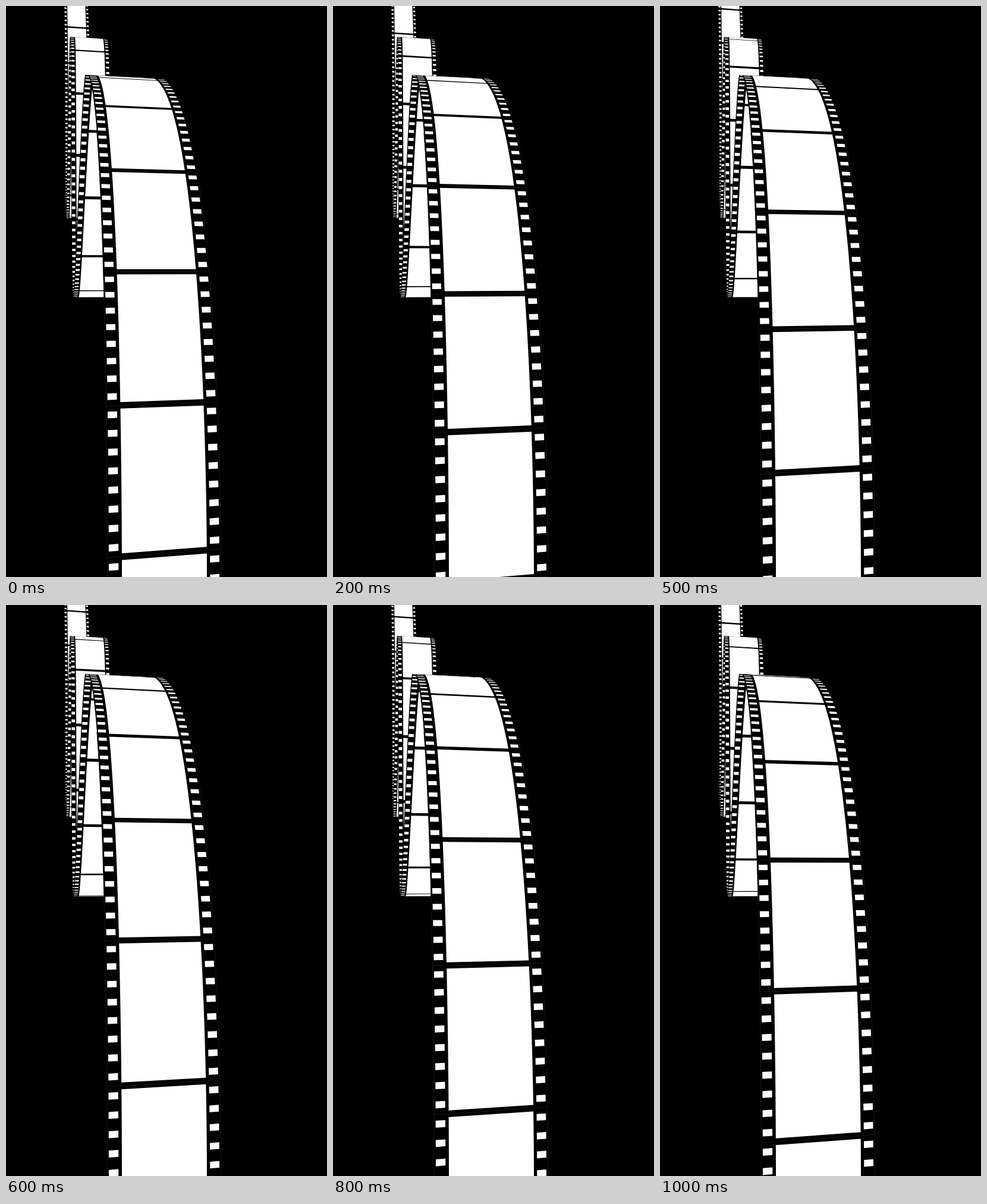
An HTML page with a canvas that plays this animation: 540 px wide and 960 px high, repeating every 1.1 s.

```html
<!DOCTYPE html>
<html lang="en">
<head>
<meta charset="utf-8">
<title>Film strip</title>
<style>
html, body { margin: 0; width: 100%; height: 100%; overflow: hidden; background: #000; }
canvas { display: block; width: 100vw; height: 100vh; }
</style>
</head>
<body>
<canvas id="stage" width="540" height="960"></canvas>
<script>
const ctx = document.getElementById('stage').getContext('2d');
const { sin, cos, floor, ceil, max, min, abs } = Math;

const STEP = 100, STEPS = 11;
const HOLES = 8;      // per picture, on each side
const BAR = 0.022;    // half a bar between pictures, in picture lengths
const HOLE = 0.0225;  // half a hole's height, in picture lengths
const EDGE = [-0.172, 1.165];
const HOLE_COLS = [[-0.154, -0.04], [1.037, 1.147]];
const HORIZON = -15;
const RATE = 0.546, CREST = -0.34;

// Picture width on screen: the film waves towards a tilted camera
function farWidth(s) {
  const u = s - CREST;
  return 1 / (0.01236 - 0.000883 * u - 0.00125 * cos(RATE * u));
}
const nearWidth = s => 97.5 + 45.5 * sin(0.3 * s);

// Depth below the horizon, in picture widths
const wave = (mid, amp, rate, crest) => s => mid - amp * cos(rate * (s - crest));
const middle = wave(5.38, 3.95, RATE, CREST);

// From the farthest length of film to the nearest
const legs = [
  { from: -26, to: -17.3, width: farWidth, drop: wave(3.27, -7.39, 0.25, -16.81) },
  { from: -17.3, to: -11.82, width: farWidth, drop: wave(6.05, 4.6, RATE, CREST) },
  { from: -11.82, to: -5.6, width: farWidth, drop: middle },
  { from: -5.6, to: -0.7, width: farWidth, drop: middle },
  { from: -0.15, to: 5.4, width: nearWidth, drop: wave(8.774, 7.39, 0.25, -0.08) }
];

// Point on the film: s along it, f across it (0 to 1 is the picture)
function point(leg, s, f) {
  const w = leg.width(s);
  const x = 80 + 0.7447 * w + 0.000417 * w * w;
  const y = HORIZON + w * leg.drop(s);
  return [x + f * w, y + f * w * 0.00016 * (445 - y)];
}

function side(leg, a, b, f) {
  const n = max(1, ceil(abs(b - a) * 16));
  for (let i = 0; i <= n; i++) ctx.lineTo(...point(leg, a + (b - a) * i / n, f));
}

function patch(leg, a, b, left, right) {
  ctx.beginPath();
  side(leg, a, b, left);
  side(leg, b, a, right);
  ctx.closePath();
  ctx.fill();
}

function drawLeg(leg, phase) {
  const { from, to } = leg;
  ctx.fillStyle = '#000';
  patch(leg, from, to, ...EDGE);
  ctx.fillStyle = '#fff';
  for (let s = floor(from) - 1 + phase; s < to; s++) {
    const a = max(from, s + BAR), b = min(to, s + 1 - BAR);
    if (b > a) patch(leg, a, b, 0, 1);
    for (let j = 0; j < HOLES; j++) {
      const m = s + (j + 0.5) / HOLES;
      if (m < from || m > to) continue;
      for (const col of HOLE_COLS) patch(leg, m - HOLE, m + HOLE, ...col);
    }
  }
}

// Faint outline of the nearest pictures
function drawSeams(leg, phase) {
  ctx.strokeStyle = '#161616';
  ctx.lineWidth = 1;
  for (const f of EDGE) {
    ctx.beginPath();
    side(leg, 1.5, leg.to, f);
    ctx.stroke();
  }
  for (let s = 2 + phase; s < leg.to; s++) {
    ctx.beginPath();
    for (const f of EDGE) ctx.lineTo(...point(leg, s, f));
    ctx.stroke();
  }
}

function draw(ms) {
  const phase = floor(ms / STEP) % STEPS / STEPS;
  ctx.fillStyle = '#000';
  ctx.fillRect(0, 0, 540, 960);
  for (const leg of legs) drawLeg(leg, phase);
  drawSeams(legs[legs.length - 1], phase);
}

const start = performance.now();
function tick() {
  draw(performance.now() - start);
  requestAnimationFrame(tick);
}
tick();
</script>
</body>
</html>
```
